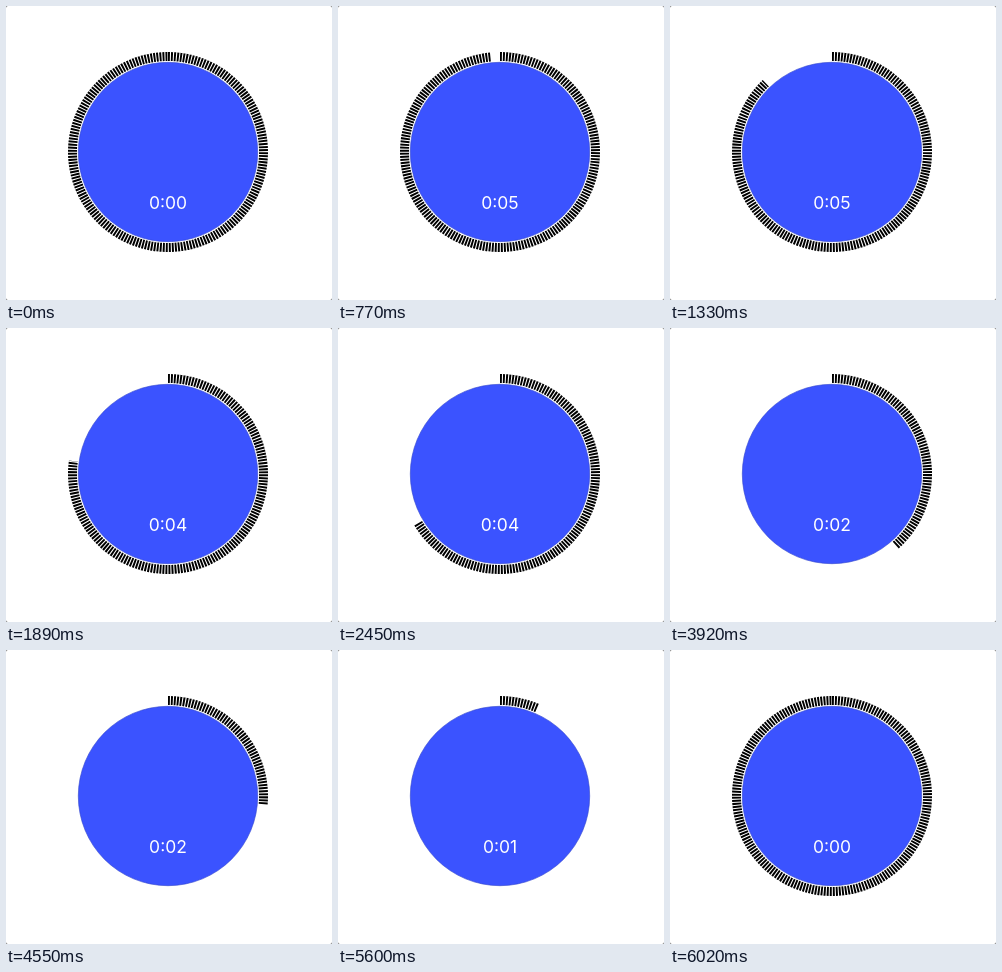
Write an HTML page that moves like this. It is 326 by 294 pixels and loops after 6370 ms.

```html
<!DOCTYPE html>
<html lang="en">
<head>
<meta charset="utf-8">
<title>Countdown</title>
<style>
  html, body { margin: 0; width: 100%; height: 100%; overflow: hidden; background: #fff; }
  svg { display: block; width: 100vw; height: 100vh; }
  text { font: 400 17.5px Inter, "Liberation Sans", sans-serif; fill: #fff; text-anchor: middle; }
</style>
</head>
<body>
<svg viewBox="0 0 326 294">
  <rect width="326" height="294" fill="#666"/>
  <rect width="326" height="294" rx="2" fill="#fff"/>
  <circle cx="162" cy="146" r="89.7" fill="#3b53ff" stroke="#3044cc" stroke-width=".6"/>
  <path id="ring" fill="none" stroke="#000" stroke-width="9"/>
  <text id="label" x="162" y="202.6">0:00</text>
</svg>
<script>
  const LOOP = 6370, STEP = 70;
  const TAP = 560, START = 690, LENGTH = 5250, RESET = 6020, SECONDS = 5;
  const CX = 162, CY = 146, R = 95.5, DASHES = 200;
  const ring = document.getElementById('ring');
  const label = document.getElementById('label');

  const period = 2 * Math.PI * R / DASHES;
  ring.setAttribute('stroke-dasharray', `${period * 0.65} ${period * 0.35}`);

  // Clockwise arc from twelve o'clock covering the given part of a turn.
  function arc(part) {
    if (part <= 0) return '';
    const a = Math.min(part, 0.99999) * 2 * Math.PI;
    const x = CX + R * Math.sin(a), y = CY - R * Math.cos(a);
    return `M${CX} ${CY - R}A${R} ${R} 0 ${part > 0.5 ? 1 : 0} 1 ${x} ${y}`;
  }

  function draw(ms) {
    const t = Math.floor((ms % LOOP) / STEP) * STEP;
    const running = t >= TAP && t < RESET;
    const left = Math.max(0, Math.min(1, 1 - (t - START) / LENGTH));
    ring.setAttribute('d', arc(running ? left : 1));
    label.textContent = '0:0' + (running ? Math.ceil(left * SECONDS) : 0);
  }

  const origin = performance.now();
  function tick() {
    draw(performance.now() - origin);
    requestAnimationFrame(tick);
  }
  draw(0);
  requestAnimationFrame(tick);
</script>
</body>
</html>
```
